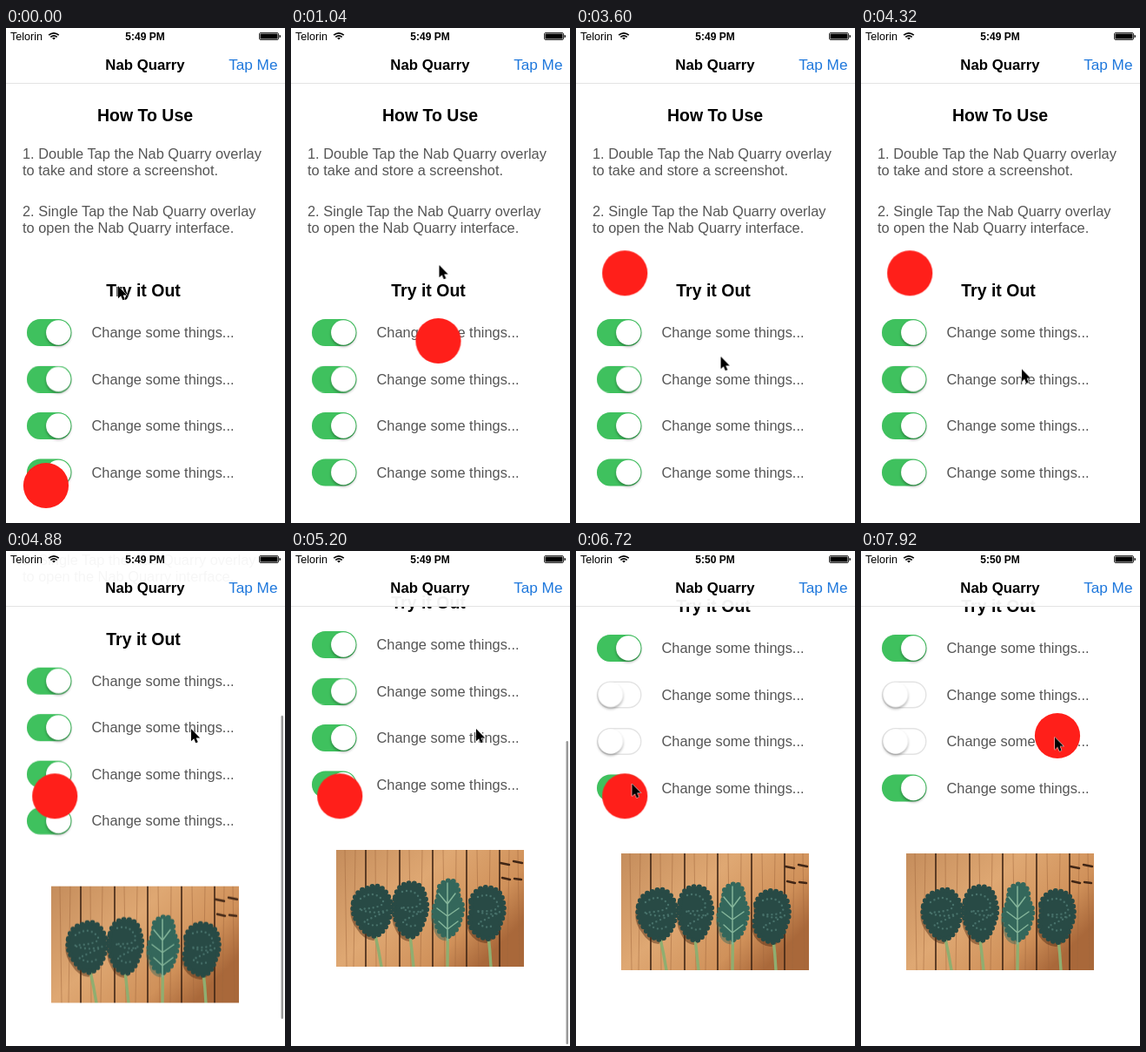
An HTML page that plays this animation: 321 px wide and 568 px high, repeating every 8000 ms.

```html
<!DOCTYPE html>
<html lang="en">
<head>
<meta charset="utf-8">
<title>Overlay demo</title>
<style>
html, body { margin: 0; width: 100%; height: 100%; overflow: hidden; background: #fff; }
svg { display: block; width: 321px; height: 568px; }
text { font-family: "Liberation Sans", Arial, sans-serif; }
.body { font-size: 16.4px; fill: #555; }
.head { font-size: 19.5px; font-weight: bold; text-anchor: middle; }
.title { font-size: 16.8px; font-weight: bold; text-anchor: middle; }
.clock { font-size: 12px; font-weight: bold; text-anchor: middle; }

.off { fill: #fff; stroke: #e3e3e3; stroke-width: 1.4; }
.on { fill: #3fc15e; }
.knob { fill: #fff; filter: drop-shadow(0 2px 1.5px rgba(0, 0, 0, .32)); }

.page, .bar, .dot, .arrow, .early, .late, .sw2 *, .sw3 * {
  animation: 8s linear infinite;
}
.page { animation-name: scroll; }
.bar { animation-name: bar; }
.dot { animation-name: dot; }
.arrow { animation-name: arrow; }
.early { animation-name: early; animation-timing-function: step-end; }
.late { animation-name: late; animation-timing-function: step-end; }
.sw2 .on { animation-name: fade2; }
.sw2 .knob { animation-name: slide2; }
.sw3 .on { animation-name: fade3; }
.sw3 .knob { animation-name: slide3; }

@keyframes scroll {
  0%, 54.9% { transform: translateY(0); }
  55% { transform: translateY(-3px); }
  57% { transform: translateY(-50px); }
  60% { transform: translateY(-175px); }
  62% { transform: translateY(-225px); }
  63.5% { transform: translateY(-240px); }
  65%, 66% { transform: translateY(-242px); }
  69%, 100% { transform: translateY(-238px); }
}
@keyframes bar {
  0%, 54.9% { transform: translateY(-150px); opacity: 0; }
  55% { transform: translateY(-148px); opacity: 1; }
  57% { transform: translateY(-120px); }
  60% { transform: translateY(-41px); }
  63.5%, 70% { transform: translateY(0); opacity: 1; }
  73%, 100% { transform: translateY(0); opacity: 0; }
}
@keyframes dot {
  0%, 1% { transform: translate(46px, 525px); }
  3%, 5% { transform: translate(36px, 525px); }
  7% { transform: translate(62px, 450px); }
  9% { transform: translate(125px, 330px); }
  11% { transform: translate(170px, 280px); }
  12% { transform: translate(171px, 305px); }
  13%, 14% { transform: translate(169.5px, 359px); }
  16% { transform: translate(105px, 450px); }
  18% { transform: translate(46px, 505px); }
  19%, 21% { transform: translate(38px, 511px); }
  23% { transform: translate(62px, 370px); }
  25% { transform: translate(82px, 282px); }
  27%, 28% { transform: translate(71.5px, 271.5px); }
  31%, 85% { transform: translate(56.2px, 281.3px); }
  89% { transform: translate(105px, 270px); }
  93% { transform: translate(190px, 275px); }
  96% { transform: translate(245px, 240px); }
  99%, 100% { transform: translate(226px, 212px); }
}
@keyframes arrow {
  0%, 1% { transform: translate(129px, 296px); }
  4%, 5% { transform: translate(42px, 518px); }
  7% { transform: translate(70px, 440px); }
  9% { transform: translate(132px, 318px); }
  11% { transform: translate(173px, 270px); }
  13%, 14% { transform: translate(170.5px, 272px); }
  16% { transform: translate(110px, 390px); }
  19%, 21% { transform: translate(48px, 510px); }
  23% { transform: translate(74px, 368px); }
  25% { transform: translate(96px, 282px); }
  27%, 28% { transform: translate(85px, 273px); }
  31%, 34% { transform: translate(72px, 283px); }
  40% { transform: translate(120px, 340px); }
  47%, 55% { transform: translate(185px, 391.5px); }
  57% { transform: translate(195px, 345px); }
  60%, 67% { transform: translate(213px, 204px); }
  72%, 74% { transform: translate(50px, 166px); }
  76.5%, 79% { transform: translate(48px, 218px); }
  83%, 85% { transform: translate(64.5px, 267px); }
  89% { transform: translate(112px, 260px); }
  93% { transform: translate(193px, 270px); }
  96% { transform: translate(243px, 240px); }
  99%, 100% { transform: translate(223px, 213.5px); }
}
@keyframes early { 0% { opacity: 1; } 71%, 100% { opacity: 0; } }
@keyframes late { 0% { opacity: 0; } 71%, 100% { opacity: 1; } }
@keyframes fade2 { 0%, 73% { opacity: 1; } 76%, 100% { opacity: 0; } }
@keyframes fade3 { 0%, 78% { opacity: 1; } 81%, 100% { opacity: 0; } }
@keyframes slide2 {
  0%, 73% { transform: translateX(0); }
  76%, 100% { transform: translateX(-20.5px); }
}
@keyframes slide3 {
  0%, 78% { transform: translateX(0); }
  81%, 100% { transform: translateX(-20.5px); }
}

.leaf { fill: #284a45; stroke: #284a45; stroke-width: 6; stroke-linecap: round; stroke-dasharray: 0 6; }
.mid { fill: #34675b; stroke: #34675b; }
.shade { fill: #4a2813; opacity: .45; }
.curl { fill: none; stroke: #47716a; stroke-width: 2.4; stroke-linecap: round; stroke-dasharray: 0 5; }
.stem { fill: none; stroke: #8fae70; stroke-width: 3.4; stroke-linecap: round; }
.gap { fill: none; stroke: #402616; stroke-width: 1.6; }
.grain { fill: none; stroke: #a0673c; stroke-width: 1; opacity: .5; }
</style>
</head>
<body>
<svg viewBox="0 0 321 568">
  <defs>
    <g id="sw">
      <rect class="off" x=".7" y=".7" width="50.1" height="29.6" rx="14.8"/>
      <rect class="on" width="51.5" height="31" rx="15.5"/>
      <circle class="knob" cx="36.3" cy="15.5" r="14.2"/>
    </g>
    <linearGradient id="wood" x1="0" y1="0" x2="1" y2=".6">
      <stop offset="0" stop-color="#c58d5c"/>
      <stop offset=".45" stop-color="#dfa873"/>
      <stop offset=".8" stop-color="#d0915a"/>
      <stop offset="1" stop-color="#a9683a"/>
    </linearGradient>
    <clipPath id="frame"><rect width="216" height="134"/></clipPath>
    <g id="leaves">
      <path d="M20 60Q23 46 36 44Q50 37 58 50Q66 62 61 78Q58 92 46 99Q34 98 27 86Q17 74 20 60Z"/>
      <path d="M68 54Q71 39 85 38Q100 38 102 54Q107 66 101 80Q96 97 87 100Q77 99 72 88Q64 74 68 54Z"/>
      <path class="mid" d="M119 42Q127 32 137 37Q142 46 140 54Q149 64 143 78Q139 96 129 99Q117 98 115 82Q109 70 117 57Z"/>
      <path d="M155 58Q159 44 173 43Q190 44 192 60Q195 73 188 86Q184 101 175 102Q163 101 156 90Q151 80 156 70Z"/>
    </g>
  </defs>

  <g class="page">
    <text class="head" x="160" y="107">How To Use</text>
    <text class="body" x="19" y="150">1. Double Tap the Nab Quarry overlay</text>
    <text class="body" x="19" y="169">to take and store a screenshot.</text>
    <text class="body" x="19" y="216">2. Single Tap the Nab Quarry overlay</text>
    <text class="body" x="19" y="235">to open the Nab Quarry interface.</text>
    <text class="head" x="158" y="308">Try it Out</text>

    <use href="#sw" x="24" y="334"/>
    <g class="sw2" transform="translate(24 387.5)">
      <rect class="off" x=".7" y=".7" width="50.1" height="29.6" rx="14.8"/>
      <rect class="on" width="51.5" height="31" rx="15.5"/>
      <circle class="knob" cx="36.3" cy="15.5" r="14.2"/>
    </g>
    <g class="sw3" transform="translate(24 441)">
      <rect class="off" x=".7" y=".7" width="50.1" height="29.6" rx="14.8"/>
      <rect class="on" width="51.5" height="31" rx="15.5"/>
      <circle class="knob" cx="36.3" cy="15.5" r="14.2"/>
    </g>
    <use href="#sw" x="24" y="494.5"/>
    <text class="body" x="98.5" y="355">Change some things...</text>
    <text class="body" x="98.5" y="408.5">Change some things...</text>
    <text class="body" x="98.5" y="462">Change some things...</text>
    <text class="body" x="98.5" y="515.5">Change some things...</text>

    <g transform="translate(52 585)" clip-path="url(#frame)">
      <rect width="216" height="134" fill="url(#wood)"/>
      <path class="grain" d="M10 0L12 134M22 0L20 134M45 0L46 134M59 0L57 134M84 0L86 134M99 0L97 134M123 0L125 134M138 0L137 134M162 0L164 134M177 0L175 134M199 0L197 134M209 0L211 134"/>
      <path class="gap" d="M34 0V134M73 0V134M111 0V134M150 0V134M188 0V134"/>
      <path d="M189 15L199 17M204 13L214 15M191 32L200 34M205 33L213 34" stroke="#402616" stroke-width="2.4" stroke-linecap="round"/>
      <use class="shade" href="#leaves" x="-3" y="5"/>
      <path class="stem" d="M45 98Q49 115 52 134M85 98Q87 115 89 134M128 45Q129 90 128 134M175 98Q177 115 178 134"/>
      <use class="leaf" href="#leaves"/>
      <path class="curl" d="M28 56Q42 46 52 56T26 68Q42 74 55 70T32 82Q44 90 52 84M76 48Q90 44 96 56T74 66Q88 74 98 70T76 82Q88 92 94 84M163 54Q178 48 185 60T161 70Q176 76 186 72T163 84Q173 92 181 86"/>
      <path d="M128 38V104M128 62L118 50M128 62L137 50M128 76L116 67M128 76L141 67M128 91L118 82M128 91L140 82" fill="none" stroke="#84b59a" stroke-width="1.5" stroke-linecap="round"/>
    </g>
  </g>

  <rect class="bar" x="316.5" y="218" width="2.5" height="348" rx="1.2" fill="#999"/>

  <rect width="321" height="63.5" fill="#fff" fill-opacity=".95"/>
  <rect y="63" width="321" height="1" fill="#e4e4e4"/>
  <text x="5" y="14" font-size="12.6">Telorin</text>
  <g fill="none" stroke="#000" stroke-width="1.7">
    <path d="M49.2 8.2Q55 3.4 60.8 8.2M51.3 10.4Q55 7.4 58.7 10.4"/>
    <path d="M53.1 11.4Q55 10.2 56.9 11.4L55 13.4Z" fill="#000" stroke="none"/>
  </g>
  <text class="clock early" x="160" y="14">5:49 PM</text>
  <text class="clock late" x="160" y="14">5:50 PM</text>
  <rect x="291.5" y="5.5" width="22" height="8" rx="1.5" fill="none" stroke="#000" stroke-width=".8"/>
  <rect x="292.5" y="6.4" width="20" height="6.2" rx=".7"/>
  <path d="M314.5 7.7Q316 8 316 9.5T314.5 11.3Z"/>
  <text class="title" x="160" y="48">Nab Quarry</text>
  <text x="312.5" y="48" font-size="17.2" text-anchor="end" fill="#1f78dc">Tap Me</text>

  <circle class="dot" r="26.1" fill="#ff1f1a"/>
  <path class="arrow" d="M0 0V14.3L3.2 11.3 5.3 16.3 7.8 15.2 5.7 10.4H10.2Z" stroke="#fff" stroke-width="1" paint-order="stroke"/>
</svg>
</body>
</html>
```
